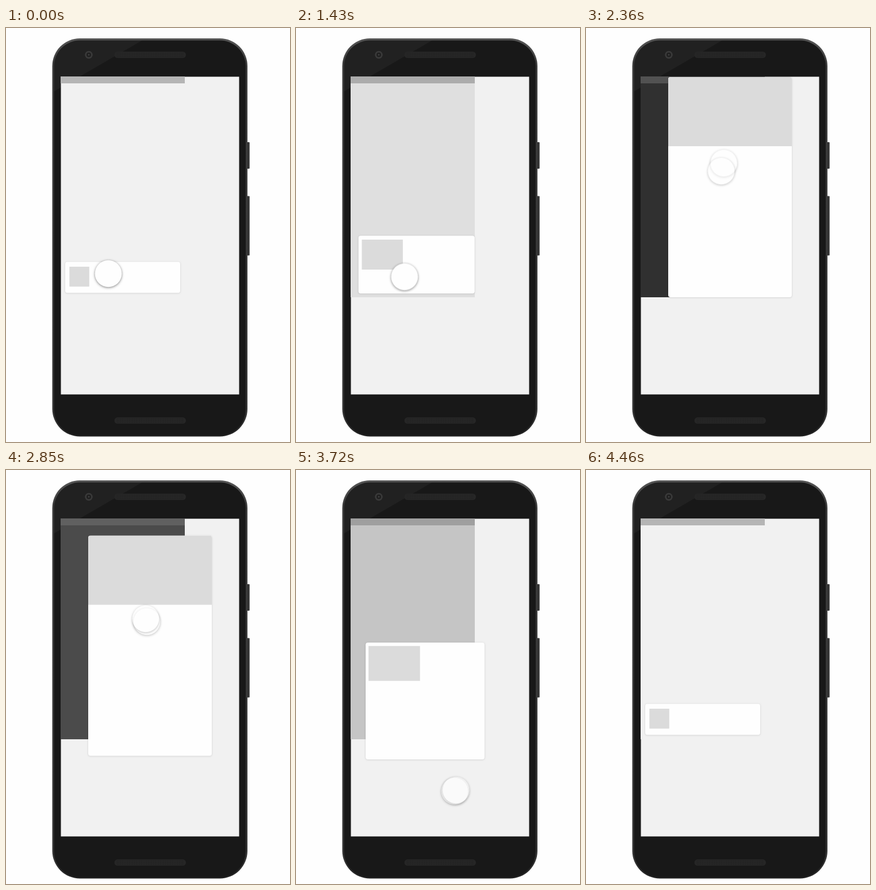
An HTML page with a canvas that plays this animation: 494 px wide and 718 px high, repeating every 4970 ms.

```html
<!DOCTYPE html>
<html lang="en">
<head>
<meta charset="utf-8">
<title>Card drag to dismiss</title>
<style>
html, body { margin: 0; width: 100%; height: 100%; overflow: hidden; background: #fefefe; }
canvas { display: block; }
</style>
</head>
<body>
<canvas id="stage" width="494" height="718"></canvas>
<script>
const ctx = document.getElementById('stage').getContext('2d');
const LOOP = 4970, STEP = 57.6, LAG = 55;
const OPEN = 1300, OPEN_TIME = 650;
const GRAB = 2420, GRAB_Y = 228;
const CLOSE = 3503, CLOSE_TIME = 571, TOUCH_END = 4455;

// Rectangles: x, y, width, height
const CHIP = [103, 405.5, 200, 54], CHIP_IMAGE = [7.3, 8.5, 34.5, 34.5];
const FULL = [143, 85, 215, 382], FULL_IMAGE = [0, 0, 215, 120];

// Turning points of the finger: time, x, y
const PATH = [
  [620, 178, 426], [1080, 189, 433], [1260, 189, 433], [1840, 188, 417.5],
  [GRAB, 242, GRAB_Y], [2640, 243, 258], [2795, 243, 258], [2850, 245, 263],
  [3313, 289, 443], [3368, 289, 483], [3520, 288, 546], [3714, 276, 557],
  [3940, 278, 560], [TOUCH_END, 530, 755]
];

const mix = (a, b, p) => a + (b - a) * p;
const mixRect = (a, b, p) => a.map((v, i) => mix(v, b[i], p));
const gray = v => `rgb(${v},${v},${v})`;

// Smooth curve through the path without overshoot
function finger(t) {
  const last = PATH.length - 1;
  t = Math.max(PATH[0][0], Math.min(PATH[last][0], t));
  const i = Math.max(0, PATH.findIndex(k => k[0] >= t) - 1);
  const [from, to] = [PATH[i], PATH[i + 1]];
  const h = to[0] - from[0], u = (t - from[0]) / h, w = 1 - u;
  return [1, 2].map(axis => {
    const slope = n => (PATH[n + 1][axis] - PATH[n][axis]) / (PATH[n + 1][0] - PATH[n][0]);
    const tangent = n => {
      const a = slope(Math.max(n - 1, 0)), b = slope(Math.min(n, last - 1));
      return a * b <= 0 ? 0 : 2 * a * b / (a + b);
    };
    return from[axis] * (1 + 2 * u) * w * w + to[axis] * u * u * (3 - 2 * u)
      + h * u * w * (tangent(i) * w - tangent(i + 1) * u);
  });
}

// cubic-bezier(.4, 0, .2, 1)
function ease(x) {
  x = Math.max(0, Math.min(1, x));
  let lo = 0, hi = 1;
  for (let i = 0; i < 24; i++) {
    const s = (lo + hi) / 2, r = 1 - s;
    if (1.2 * r * r * s + 0.6 * r * s * s + s * s * s < x) lo = s; else hi = s;
  }
  return lo * lo * (3 - 2 * lo);
}

// From the tap on, the picture advances in discrete steps
function snap(t) {
  if (t < 1260) return t;
  const from = t < 2846 ? 1260 : 2850;
  return from + Math.floor((t - from + 4) / STEP) * STEP;
}

function box(x, y, w, h, r, fill, c = ctx) {
  c.beginPath();
  c.roundRect(x, y, w, h, r);
  c.fillStyle = fill;
  c.fill();
}

function shadow(c, alpha, blur, dy) {
  c.shadowColor = `rgba(0,0,0,${alpha})`;
  c.shadowBlur = blur;
  c.shadowOffsetY = dy;
}

const disc = (x, y, r, fill, c) => box(x - r, y - r, 2 * r, 2 * r, r, fill, c);

function speaker(y) {
  box(188.5, y, 124.5, 11, 5.5, '#262626');
  ctx.fillStyle = '#1b1b1b';
  for (let x = 193; x < 310; x += 3)
    for (let row = 2; row < 10; row += 3) ctx.fillRect(x, y + row, 1, 1);
}

function glare() {
  ctx.save();
  ctx.clip();
  ctx.beginPath();
  ctx.moveTo(80, 18);
  ctx.lineTo(243, 18);
  ctx.lineTo(80, 112);
  ctx.fillStyle = 'rgba(255,255,255,0.04)';
  ctx.fill();
  ctx.restore();
}

function phone() {
  ctx.fillStyle = '#fefefe';
  ctx.fillRect(0, 0, 494, 718);
  box(418, 198, 5.7, 46, 1, '#343434');
  box(418, 291.5, 5.7, 103, 1, '#343434');
  const rim = ctx.createLinearGradient(0, 18, 0, 708);
  rim.addColorStop(0, '#555');
  rim.addColorStop(0.06, '#3c3c3c');
  rim.addColorStop(0.95, '#333');
  rim.addColorStop(1, '#222');
  box(80.5, 18, 339.5, 690.5, 48, rim);
  box(83.5, 21.5, 333.5, 685, 45, '#181818');
  glare();
  speaker(41);
  speaker(675.3);
  disc(144, 46.5, 6.7, '#3a3a3a');
  disc(144, 46.5, 4, '#202020');
  disc(144, 46.5, 1.3, '#444');
  box(95.5, 84.5, 310, 551, 0, '#f1f1f1');
}

function scrim(a) {
  if (a > 0) box(95, 84, 216, 383, 0, gray(mix(241, 48, a)));
  box(95, 84, 216, 12, 0, gray(mix(181, 82, a)));
}

function card([x, y, w, h], [ix, iy, iw, ih]) {
  ctx.save();
  shadow(ctx, 0.16, 3, 0.5);
  box(x, y, w, h, 4, '#fefefe');
  shadow(ctx, 0, 0, 0);
  ctx.clip();
  box(x + ix, y + iy, iw, ih, 0, '#dbdbdb');
  ctx.restore();
}

// The touch dot with its shadow, kept as one layer so that it can fade as a whole
const dot = document.createElement('canvas');
dot.width = dot.height = 64;
const dotCtx = dot.getContext('2d');
shadow(dotCtx, 0.5, 4, 1);
disc(32, 32, 23.3, '#fefefe', dotCtx);

function touch(t) {
  const now = finger(t), before = finger(t - LAG);
  const blurred = Math.hypot(now[0] - before[0], now[1] - before[1]) > 2;
  ctx.globalAlpha = blurred ? 0.5 : 1;
  for (const [x, y] of blurred ? [now, before] : [now]) ctx.drawImage(dot, x - 32, y - 32);
  ctx.globalAlpha = 1;
}

// Elastic resistance: the card follows with the root of the drag distance
function pull(t) {
  if (t < GRAB) return 0;
  return 4.85 * Math.sqrt(Math.max(0, finger(Math.min(t, CLOSE))[1] - GRAB_Y));
}

function draw(time) {
  const t = snap(time % LOOP);
  const closing = t >= CLOSE;
  const moved = ease(closing ? (t - CLOSE) / CLOSE_TIME : (t - OPEN) / OPEN_TIME);
  const lead = 1 - (1 - moved) ** 1.5;
  const p = closing ? 1 - moved : moved;
  const offset = pull(t);
  const [x, y, w, h] = FULL;

  phone();
  scrim(p ** 1.2 * (1 - 0.0048 * offset));
  card(mixRect(CHIP, [x, y + offset, w, h], p),
    mixRect(CHIP_IMAGE, FULL_IMAGE, closing ? 1 - lead : lead));
  if (t < TOUCH_END) touch(t);
}

const start = performance.now();
function tick() {
  draw(performance.now() - start);
  requestAnimationFrame(tick);
}
tick();
</script>
</body>
</html>
```
